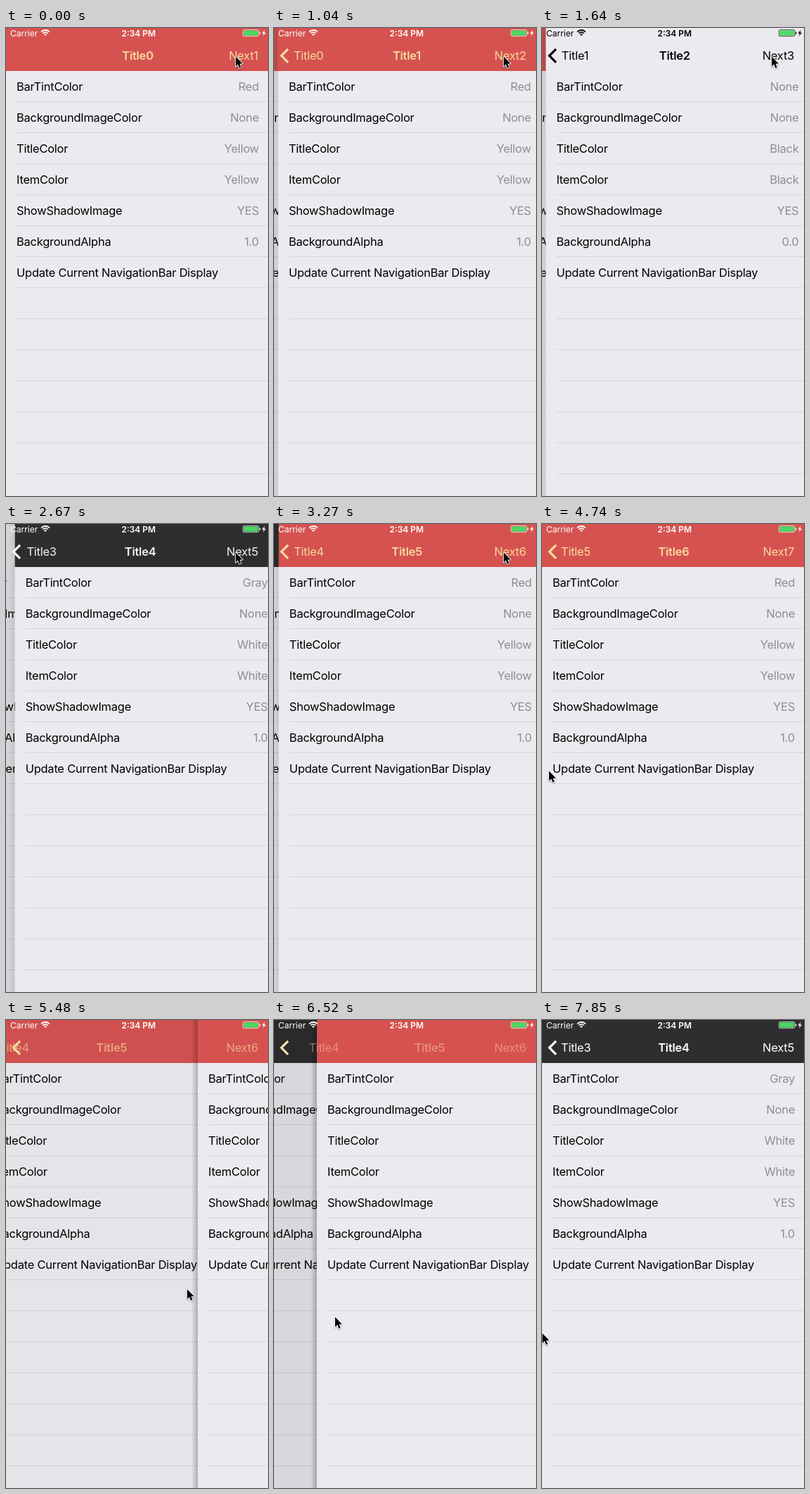
An HTML page with a canvas for the animation above (8000 ms loop, 373 by 664 pixels).

```html
<!DOCTYPE html>
<html lang="en">
<head>
<meta charset="utf-8">
<title>Navigation bar transitions</title>
<style>
html, body { margin: 0; width: 100%; height: 100%; overflow: hidden; background: #ebeaef; }
canvas { display: block; width: 373px; height: 664px; }
</style>
</head>
<body>
<canvas id="stage"></canvas>
<script>
const W = 373, H = 664, LOOP = 8000, BAR = 61, ROW = 44;
const FIRST_TICK = 590, TICK = 148.1;
const FAMILY = 'Inter, "Liberation Sans", sans-serif';

const canvas = document.getElementById('stage');
const ctx = canvas.getContext('2d');
const ratio = window.devicePixelRatio || 1;
canvas.width = W * ratio;
canvas.height = H * ratio;
ctx.scale(ratio, ratio);

const LABELS = ['BarTintColor', 'BackgroundImageColor', 'TitleColor', 'ItemColor',
  'ShowShadowImage', 'BackgroundAlpha', 'Update Current NavigationBar Display'];
const style = (bar, tint, status, tintName, colorName, alpha) =>
  ({ bar, tint, status, values: [tintName, 'None', colorName, colorName, 'YES', alpha] });
const RED = style('#d55250', [249, 220, 158], '#fff', 'Red', 'Yellow', '1.0');
const CLEAR = style(null, [0, 0, 0], '#000', 'None', 'Black', '0.0');
const GRAY = style('#2e2e30', [255, 255, 255], '#fff', 'Gray', 'White', '1.0');
const PAGES = [RED, RED, CLEAR, CLEAR, GRAY, RED, RED];

const PUSHES = [700, 1287, 1835, 2378, 2931, 3480];
const PUSH_TIME = 520, PRESS_TIME = 121;
// Swipes back: upper page and [time, left edge] steps
const SWIPES = [
  { from: 6, steps: [[4830, 0], [5420, 230], [5560, 335], [5700, W]] },
  { from: 5, steps: [[6340, 0], [6514, 61], [6800, 244], [6930, 335], [7080, W]] }
];
const CURSOR = [[3840, 327, 40.5], [4100, 250, 120], [4640, 10, 350.5], [4800, 10, 350.5],
  [5420, 256, 380], [5600, 262, 386], [6190, 9, 412], [6330, 18, 415], [6514, 87, 421.5],
  [6800, 270, 430], [6950, 272, 433], [7400, 3, 447], [7690, 3, 447], [7698, 2, 446], [7840, 0.5, 444.5]];

const clamp = v => Math.max(0, Math.min(1, v));
const rgb = c => `rgb(${c.map(Math.round)})`;
const mix = (a, b, k) => a.map((v, i) => v + (b[i] - v) * k);

function follow(steps, t) {
  if (t <= steps[0][0]) return steps[0].slice(1);
  for (let i = 1; i < steps.length; i++) {
    const [start, ...a] = steps[i - 1], [end, ...b] = steps[i];
    if (t < end) return mix(a, b, (t - start) / (end - start));
  }
  return steps[steps.length - 1].slice(1);
}

// Share of the width that the upper page still has to travel; critically damped spring
function spring(ms) {
  const x = 18.26 * ms / 1000;
  return ms < PUSH_TIME ? (1 + x) * Math.exp(-x) : 0;
}

function stateAt(t) {
  let state = { top: 0, shift: 0, barShift: 0 };
  PUSHES.forEach((start, i) => {
    if (t < start) return;
    const shift = spring(t - start);
    state = { top: i + 1, shift, barShift: shift ** 1.2 };
  });
  for (const { from, steps } of SWIPES) {
    if (t < steps[0][0]) continue;
    const shift = follow(steps, t)[0] / W;
    state = shift < 1 ? { top: from, shift, barShift: shift } : { top: from - 1, shift: 0, barShift: 0 };
  }
  state.pressed = PUSHES.some(start => t < start && start - t < PRESS_TIME);
  return state;
}

function text(str, x, y, color, align = 'left', { weight = 400, size = 16.5, spacing = -0.25 } = {}) {
  ctx.font = `${weight} ${size}px ${FAMILY}`;
  ctx.letterSpacing = spacing + 'px';
  ctx.textAlign = align;
  ctx.fillStyle = color;
  ctx.fillText(str, x, y);
}

function line(points, width, color) {
  ctx.beginPath();
  points.forEach(([x, y]) => ctx.lineTo(x, y));
  ctx.lineWidth = width;
  ctx.strokeStyle = color;
  ctx.stroke();
}

function shape(points, fill) {
  ctx.beginPath();
  points.forEach(([x, y]) => ctx.lineTo(x, y));
  ctx.closePath();
  ctx.fillStyle = fill;
  ctx.fill();
}

function drawPage(page, left) {
  ctx.save();
  ctx.translate(left, 0);
  ctx.fillStyle = '#ebeaef';
  ctx.fillRect(0, 0, W, H);
  if (page.bar) {
    ctx.fillStyle = page.bar;
    ctx.fillRect(0, 0, W, BAR);
  }
  ctx.fillStyle = '#d6d5da';
  for (let y = BAR + ROW - 1; y < H; y += ROW) ctx.fillRect(15, y, W, 1);
  LABELS.forEach((label, i) => text(label, 15, 89 + i * ROW, '#000'));
  page.values.forEach((value, i) => text(value, 360, 89 + i * ROW, '#8e8e93', 'right'));
  ctx.restore();
}

function drawEdgeShadow(left) {
  const shade = ctx.createLinearGradient(left - 9, 0, left, 0);
  shade.addColorStop(0, 'rgba(0,0,0,0)');
  shade.addColorStop(1, `rgba(0,0,0,${0.24 * clamp(left / 40)})`);
  ctx.fillStyle = shade;
  ctx.fillRect(left - 9, 0, 9, H);
}

function drawItems(index, alpha, titleX, backX, pressed) {
  if (alpha <= 0) return;
  const color = rgb(PAGES[index].tint);
  ctx.globalAlpha = alpha;
  text('Title' + index, titleX, 45, color, 'center', { weight: 600 });
  if (index) text('Title' + (index - 1), backX, 45, color);
  ctx.globalAlpha = alpha * (pressed ? 0.25 : 1);
  text('Next' + (index + 1), 359, 45, color, 'right');
  ctx.globalAlpha = 1;
}

function drawBarItems({ top, shift, barShift: k, pressed }) {
  drawItems(top, clamp(1 - 3.3 * k), 187.5 + 208 * k, 27 + 138 * k, pressed);
  if (shift) drawItems(top - 1, clamp((k - 0.35) * 1.6), 187.5 - 138 * (1 - k), 27 - 138 * (1 - k));
  if (!top) return;
  ctx.globalAlpha = top === 1 ? 1 - k : 1;
  line([[20, 29.8], [10.5, 39.3], [20, 48.8]], 3.1, rgb(mix(PAGES[top].tint, PAGES[top - 1].tint, k)));
  ctx.globalAlpha = 1;
}

function drawStatus(color) {
  text('Carrier', 6, 11.5, color, 'left', { size: 12, spacing: 0 });
  text('2:34 PM', 188.8, 11.5, color, 'center', { size: 12, spacing: 0, weight: 600 });
  ctx.strokeStyle = color;
  for (const [radius, width] of [[8, 1.8], [4.9, 1.8], [1.4, 2.6]]) {
    ctx.beginPath();
    ctx.arc(56, 11, radius, -Math.PI * 0.76, -Math.PI * 0.24);
    ctx.lineWidth = width;
    ctx.stroke();
  }
  ctx.beginPath();
  ctx.roundRect(337.3, 2.5, 22.6, 9.2, 1.8);
  ctx.lineWidth = 0.7;
  ctx.stroke();
  ctx.fillStyle = '#4cd964';
  ctx.fillRect(338.4, 3.5, 20.4, 7.2);
  ctx.fillStyle = color;
  ctx.fillRect(360.8, 5.4, 1.3, 3.4);
  shape([[368.6, 2.4], [364.3, 7.7], [366.9, 7.7], [365.7, 11.8], [370, 6.4], [367.4, 6.4]], color);
}

function drawCursor(x, y) {
  const arrow = [[0, 0], [0, 14], [3.2, 11.1], [5.4, 16.2], [7.7, 15.2], [5.6, 10.3], [9.8, 10.1]];
  ctx.save();
  ctx.translate(x, y);
  ctx.lineJoin = 'round';
  ctx.shadowColor = 'rgba(0,0,0,.35)';
  ctx.shadowBlur = 2 * ratio;
  ctx.shadowOffsetY = ratio;
  line([...arrow, arrow[0]], 1.8, '#fff');
  ctx.shadowColor = 'transparent';
  shape(arrow, '#000');
  ctx.restore();
}

function draw(t) {
  const state = stateAt(t);
  const left = state.shift * W;
  if (state.shift) {
    drawPage(PAGES[state.top - 1], -0.3 * (W - left));
    ctx.fillStyle = `rgba(0,0,0,${0.1 * (1 - state.shift)})`;
    ctx.fillRect(0, 0, W, H);
    drawEdgeShadow(left);
  }
  drawPage(PAGES[state.top], left);
  drawBarItems(state);
  drawStatus(PAGES[state.top].status);
  drawCursor(...follow(CURSOR, t));
}

const origin = performance.now();
function frame() {
  const t = (performance.now() - origin) % LOOP;
  // The screen is refreshed in coarse steps, as in a low frame rate recording
  const step = Math.floor((t - FIRST_TICK) / TICK);
  draw(step < 0 ? 0 : FIRST_TICK + step * TICK);
  requestAnimationFrame(frame);
}
frame();
</script>
</body>
</html>
```
